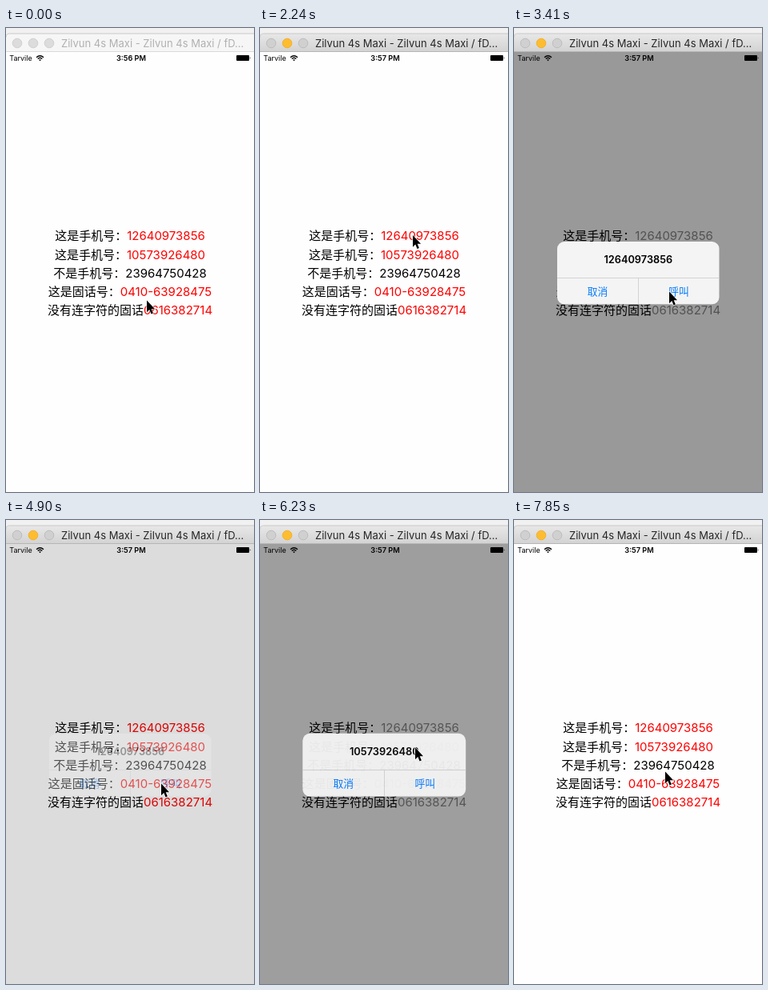
Write an HTML page that moves like this. It is 310 px wide and 580 px high and loops after 8 s.

```html
<!DOCTYPE html>
<html lang="zh-CN">
<head>
<meta charset="utf-8">
<title>Call alert</title>
<style>
  html, body { margin: 0; width: 100%; height: 100%; overflow: hidden; background: #fff; }
  svg { display: block; width: 310px; height: 580px; }
  text { font-family: Inter, "Noto Sans CJK SC", "Noto Sans CJK", sans-serif; white-space: pre; }
  .han { font-family: "Noto Sans CJK SC", "Noto Sans CJK", sans-serif; }
  .mid { text-anchor: middle; }
  .line { font-size: 15px; }
  .link { fill: #f00; }
  .dimmed .link { fill: #888; }
  .title { font-size: 13px; }
  .clock { font-size: 9.2px; font-weight: 600; }
  .number { font-size: 12.75px; font-weight: 600; }
  .button { font-size: 12.75px; fill: #007aff; }
  .lamp { fill: #dcdcdc; stroke: #d0d0d0; }
  .active .lamp { fill: #d0d0d0; stroke: #bdbdbd; }
  .active #yellow { fill: #fdbd2f; stroke: #f2b032; }
  #bar, #title { fill: #f6f6f6; }
  #title { fill: #b0b0b0; }
  #edge { stroke: #dadada; }
  .active #bar { fill: url(#metal); }
  .active #title { fill: #262626; }
  .active #edge { stroke: #b6b6b6; }
  #alert { transform-origin: 155.3px 306px; }
</style>
</head>
<body>
<svg id="stage" viewBox="0 0 310 580">
  <defs>
    <linearGradient id="metal" x1="0" y1="0" x2="0" y2="1">
      <stop offset="0" stop-color="#e8e8e8"/>
      <stop offset="1" stop-color="#d2d2d2"/>
    </linearGradient>
  </defs>

  <rect width="310" height="580" fill="#fefefe"/>
  <rect width="310" height="9" fill="#f1f1f1"/>
  <path id="bar" d="M0 30V12Q0 7 4.5 7H310V30Z"/>
  <path d="M0 11.5Q0 7 4.5 7H310" fill="none" stroke="#c9c9c9"/>
  <path id="edge" d="M0 29.5H310"/>
  <circle class="lamp" cx="14" cy="19" r="5.8"/>
  <circle class="lamp" cx="34" cy="19" r="5.8" id="yellow"/>
  <circle class="lamp" cx="54" cy="19" r="5.8"/>
  <text id="title" class="title" x="69" y="24">Zilvun 4s Maxi - Zilvun 4s Maxi / fD...</text>

  <text x="4.3" y="41.2" font-size="9">Tarvile</text>
  <g fill="none" stroke="#000" stroke-width="1.3">
    <path d="M38 36.8Q42.5 32.6 47 36.8M39.7 38.6Q42.5 36 45.3 38.6"/>
    <path d="M42.5 41.3L41 39.7Q42.5 38.6 44 39.7Z" fill="#000" stroke="none"/>
  </g>
  <text id="clock" class="clock mid" x="156.5" y="41.2"></text>
  <rect x="288" y="34" width="16" height="7" rx="1"/>
  <path d="M304.8 36.2Q306.6 37.5 304.8 38.8Z"/>

  <g id="lines"></g>
  <rect id="dim" y="30" width="310" height="550" fill-opacity=".4"/>

  <g id="alert">
    <rect x="54" y="267" width="202.5" height="78.3" rx="9" fill="#f4f4f4"/>
    <path d="M54 312.5H256.5M155.5 312.5V345.3" stroke="#cbcbcb" stroke-width=".8"/>
    <text id="number" class="number mid" x="155.3" y="294"></text>
    <text class="button han mid" x="104.6" y="334">取消</text>
    <text class="button han mid" x="205.9" y="334">呼叫</text>
  </g>

  <path id="cursor" d="M2 1.6V16.2L5.3 13.1L7.5 18.5L9.9 17.5L7.7 12.2H12.1Z"
        stroke="#fff" stroke-width="1.2" paint-order="stroke"/>
</svg>
<script>
const LOOP = 8000, TICK = 148;   // the screen refreshes once per tick
const $ = id => document.getElementById(id);

const rows = [
  ['这是手机号：', '12640973856', true],
  ['这是手机号：', '10573926480', true],
  ['不是手机号：', '23964750428', false],
  ['这是固话号：', '0410-63928475', true],
  ['没有连字符的固话', '0616382714', true]
];
$('lines').innerHTML = rows.map(([label, number, link], i) =>
  `<text class="line mid" x="155" y="${265.3 + i * 23.25}"><tspan class="han">${label}</tspan>` +
  `<tspan${link ? ' class="link"' : ''}>${number}</tspan></text>`).join('');

// Ticks at which each alert opens and closes.
const calls = [
  { open: 16, close: 32, number: rows[0][1] },
  { open: 41, close: 49, number: rows[1][1] }
];

// Pointer glides, in ticks, each starting where the last one ended.
const start = { x: 174, y: 339 };
const glides = [
  { from: 2, to: 7, x: 189, y: 257.5 },
  { from: 17, to: 23, x: 192, y: 328 },
  { from: 34, to: 38, x: 192, y: 283 },
  { from: 42, to: 47, x: 188, y: 327 },
  { from: 50, to: 53, x: 187, y: 313 }
];

function pointer(n) {
  let { x, y } = start;
  for (const g of glides) {
    const p = Math.min(1, Math.max(0, (n - g.from) / (g.to - g.from)));
    const e = p * p * (3 - 2 * p);
    x += (g.x - x) * e;
    y += (g.y - y) * e;
  }
  return { x, y };
}

// Opening decays quickly to full; closing follows a critically damped spring.
const appear = k => 1 - .5 * .1 ** k;
const vanish = k => {
  const s = .68 + 1.62 * k;
  return (1 + s) * Math.exp(-s);
};

function draw(ms) {
  const n = Math.floor(ms % LOOP / TICK);
  const call = calls.filter(c => n >= c.open).pop();
  const closing = call && n >= call.close;
  const shown = !call ? 0 : closing ? vanish(n - call.close) : appear(n - call.open);
  const scale = closing ? 1 : 1 + .14 * (1 - shown);
  const { x, y } = pointer(n);

  $('stage').classList.toggle('active', n >= 15);
  $('lines').classList.toggle('dimmed', Boolean(call) && !closing);
  $('clock').textContent = n < 10 ? '3:56 PM' : '3:57 PM';
  $('number').textContent = call ? call.number : '';
  $('dim').style.opacity = $('alert').style.opacity = shown < .01 ? 0 : shown;
  $('alert').style.transform = `scale(${scale})`;
  $('cursor').style.transform = `translate(${x}px, ${y}px)`;
}

const began = performance.now();
function loop() {
  draw(performance.now() - began);
  requestAnimationFrame(loop);
}
loop();
</script>
</body>
</html>
```
